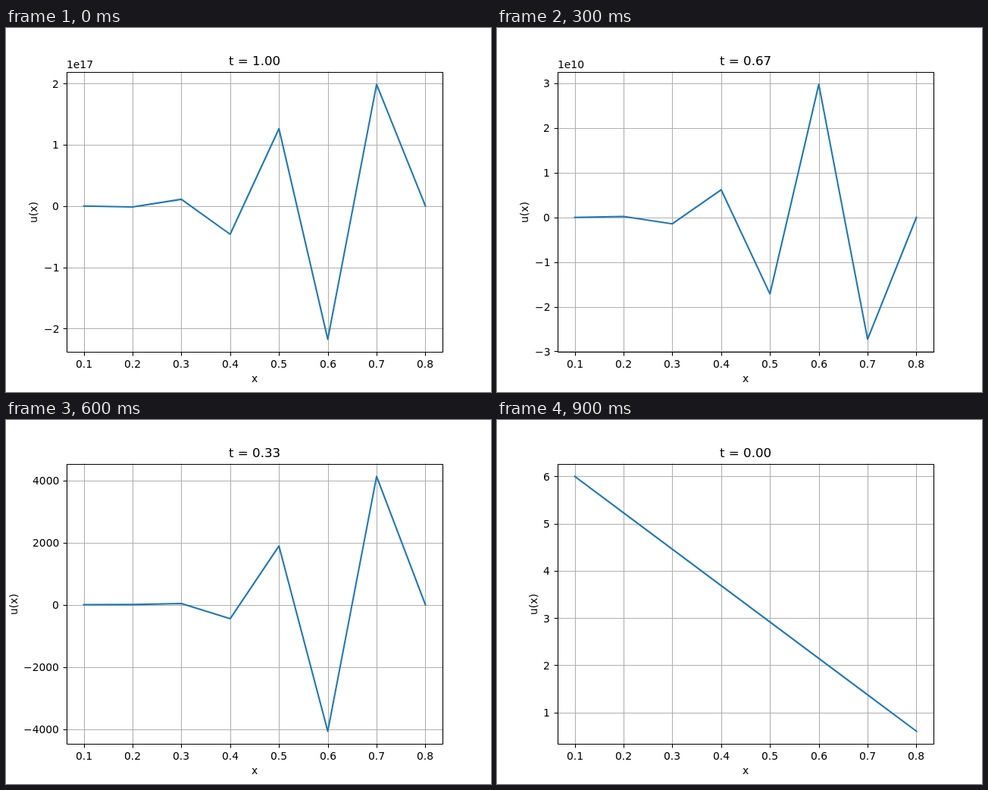
Recreate the animation shown at these times as an HTML page with a canvas. Size 640x480 px, loop 1000 ms.

```html
<!DOCTYPE html>
<html lang="en">
<head>
<meta charset="utf-8">
<title>Unstable diffusion</title>
<style>
html, body { margin: 0; width: 100%; height: 100%; overflow: hidden; background: #fff; }
canvas { display: block; }
</style>
</head>
<body>
<canvas id="plot" width="640" height="480"></canvas>
<script>
const ctx = document.getElementById('plot').getContext('2d');
const LEFT = 80, RIGHT = 576, TOP = 57.6, BOTTOM = 427.2;
const PT = 100 / 72, HAIR = 0.8 * PT, TICK = 3.5 * PT;
const H = 0.1, DT = 0.05, FRAMES = 10;
const xs = Array.from({ length: 8 }, (_, i) => (i + 1) * H);

// Explicit Euler for u_t = (x u_x)_x with fixed ends; the step is too long, so it blows up.
function advance(u) {
  const flux = i => (xs[i] + H / 2) * (u[i + 1] - u[i]);
  return u.map((v, i) =>
    i === 0 || i === u.length - 1 ? v : v + DT / (H * H) * (flux(i) - flux(i - 1)));
}

const states = [xs.map((_, i) => 6 - 5.4 * i / 7)];
while (states.length <= 20) states.push(advance(states[states.length - 1]));

const snap = v => Math.floor(v + 0.5) + 0.5;
const toX = x => LEFT + (x - 0.065) / 0.77 * (RIGHT - LEFT);

function tickStep(range) {
  const raw = range / 9;
  const base = 10 ** Math.floor(Math.log10(raw));
  return base * [1, 2, 2.5, 5, 10].find(s => s * base >= raw);
}

function line(x1, y1, x2, y2, color) {
  ctx.strokeStyle = color;
  ctx.lineWidth = HAIR;
  ctx.lineCap = 'butt';
  ctx.beginPath();
  ctx.moveTo(x1, y1);
  ctx.lineTo(x2, y2);
  ctx.stroke();
}

// Draws text on whole pixels and returns its width; align is the share left of x.
function label(str, x, y, align, size = 10) {
  ctx.font = `${size * PT}px "DejaVu Sans", sans-serif`;
  const w = ctx.measureText(str).width;
  ctx.fillText(str, Math.round(x - w * align), Math.round(y));
  return w;
}

function draw(frame) {
  const t = 1 - frame / (FRAMES - 1);
  const u = states[Math.floor(t / DT + 1e-9)];
  const min = Math.min(...u), max = Math.max(...u);
  const pad = (max - min) * 0.05, lo = min - pad, hi = max + pad;
  const toY = v => BOTTOM - (v - lo) / (hi - lo) * (BOTTOM - TOP);
  const step = tickStep(hi - lo);
  const ticks = [];
  for (let k = Math.ceil(lo / step); k * step <= hi; k++) ticks.push(k * step);
  const peak = Math.max(...ticks.map(Math.abs));
  const order = Math.floor(Math.log10(peak) + 1e-9);
  const scale = order >= 6 ? 10 ** order : 1;

  ctx.fillStyle = '#fff';
  ctx.fillRect(0, 0, 640, 480);
  ctx.fillStyle = '#000';

  for (const x of xs) line(snap(toX(x)), BOTTOM, snap(toX(x)), TOP, '#b0b0b0');
  for (const v of ticks) line(LEFT, snap(toY(v)), RIGHT, snap(toY(v)), '#b0b0b0');

  ctx.strokeStyle = '#1f77b4';
  ctx.lineWidth = 1.5 * PT;
  ctx.lineCap = 'square';
  ctx.lineJoin = 'round';
  ctx.beginPath();
  u.forEach((v, i) => ctx.lineTo(toX(xs[i]), toY(v)));
  ctx.stroke();

  for (const x of xs) {
    line(snap(toX(x)), 427.5, snap(toX(x)), 427.5 + TICK, '#000');
    label(x.toFixed(1), toX(x), 448, 0.5);
  }
  let widest = 0;
  for (const v of ticks) {
    const y = toY(v);
    line(80.5 - TICK, snap(y), 80.5, snap(y), '#000');
    const str = String(Math.round(v / scale)).replace('-', '\u2212');
    widest = Math.max(widest, label(str, LEFT - 2 * TICK, y + 5.5, 1));
  }

  ctx.lineWidth = HAIR;
  ctx.lineCap = 'square';
  ctx.strokeRect(80.5, 58.5, 496, 369);

  label('x', 328, 467, 0.5);
  label(`t = ${t.toFixed(2)}`, 328, 49, 0.5, 12);
  if (scale > 1) label(`1e${order}`, LEFT, 53, 0);

  ctx.save();
  ctx.translate(Math.round(LEFT - 2 * TICK - widest - 4 * PT - 3), 243);
  ctx.rotate(-Math.PI / 2);
  label('u(x)', 0, 0, 0.5);
  ctx.restore();
}

function tick(now) {
  draw(Math.floor(now / 100) % FRAMES);
  requestAnimationFrame(tick);
}
draw(0);
requestAnimationFrame(tick);
</script>
</body>
</html>
```
